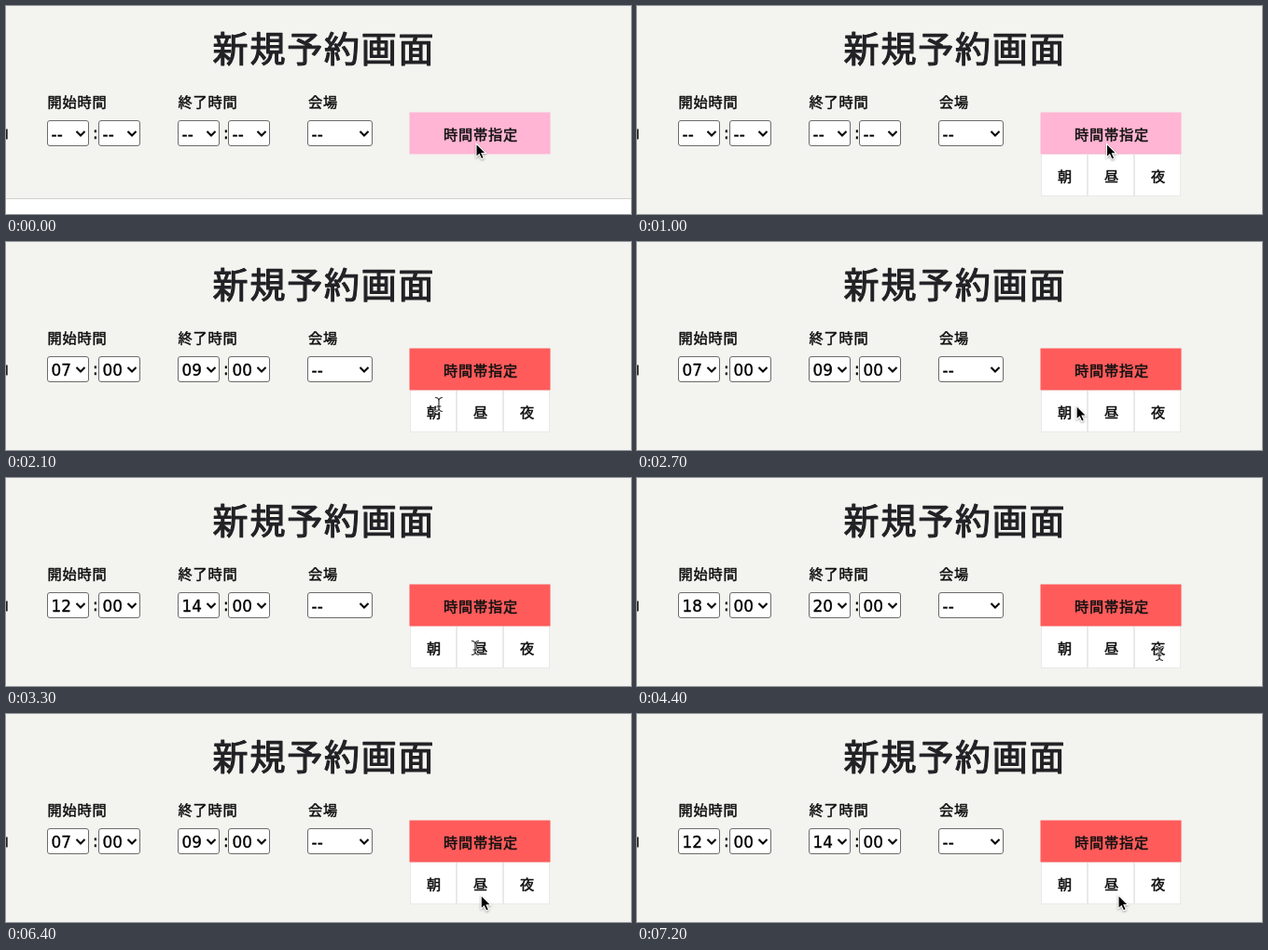
An HTML page for the animation above (7300 ms loop, 670 by 224 pixels).

```html
<!DOCTYPE html>
<html lang="ja">
<head>
<meta charset="utf-8">
<style>
  html, body { margin: 0; width: 100%; height: 100%; overflow: hidden; background: #f3f3ef; }
  svg { display: block; }
  text {
    font: 15.2px "Noto Sans CJK JP", "Noto Sans CJK", sans-serif; letter-spacing: .8px;
    fill: #111; stroke: #111; stroke-width: .5; stroke-linejoin: round;
  }
  .title { font-size: 38px; letter-spacing: 1.8px; fill: #222226; stroke: #222226; stroke-width: 1.2; }
  .middle { text-anchor: middle; }
  .value { font: 16.8px "DejaVu Sans", sans-serif; letter-spacing: 0; fill: #000; stroke: #000; stroke-width: .35; }
  .box { fill: #fff; stroke: #6b6b6b; }
  .cell { fill: #fff; stroke: #e9e9e8; }
  .chevron { fill: none; stroke: #000; stroke-width: 2.1; }
  #arrow { filter: drop-shadow(0 1px 1px rgba(0, 0, 0, .35)); }
</style>
</head>
<body>
<svg width="670" height="224" viewBox="0 0 670 224">
  <text class="title middle" x="341" y="60">新規予約画面</text>
  <rect y="132.5" width="1.7" height="11" fill="#222"/>
  <text x="44.5" y="109.4">開始時間</text>
  <text x="184.5" y="109.4">終了時間</text>
  <text x="324" y="109.4">会場</text>
  <text class="value" x="93" y="143">:</text>
  <text class="value" x="233" y="143">:</text>
  <g id="selects"></g>
  <g id="footer">
    <rect y="207" width="670" height="17" fill="#fff"/>
    <path d="M0 207.5H670" stroke="#cfcfcd"/>
  </g>
  <g id="menu"></g>
  <rect id="button" x="432.5" y="114.5" width="151" height="45"/>
  <text class="middle" x="509" y="143.7">時間帯指定</text>
  <path id="arrow" d="M0 0V14.6L3.3 11.6 5.6 16.8 8.3 15.6 6 10.5H10.5Z" fill="#000" stroke="#fff" stroke-width="1.1"/>
  <g id="beam" fill="none" stroke-linecap="round">
    <path d="M-3.5-7.5Q0-7.5 0-5V5Q0 7.5-3.5 7.5M3.5-7.5Q0-7.5 0-5M3.5 7.5Q0 7.5 0 5M-2 2H2" stroke="#fff" stroke-width="2.4"/>
    <path d="M-3.5-7.5Q0-7.5 0-5V5Q0 7.5-3.5 7.5M3.5-7.5Q0-7.5 0-5M3.5 7.5Q0 7.5 0 5M-2 2H2" stroke="#111"/>
  </g>
</svg>
<script>
const LOOP = 7300, STEP = 100;
const el = id => document.getElementById(id);
const ease = (t, from, to) => {
  const u = Math.min(1, Math.max(0, (t - from) / (to - from)));
  return u * u * (3 - 2 * u);
};

// Start hour, start minute, end hour, end minute, venue
const selects = [[44, 45], [99, 45], [184, 45], [238, 45], [323, 70]];
el('selects').innerHTML = selects.map(([x, w]) => `
  <rect class="box" x="${x + .5}" y="123.5" width="${w - 1}" height="27" rx="2.5"/>
  <text class="value" x="${x + 4.6}" y="144">--</text>
  <path class="chevron" d="M${x + w - 13.5} 135l4.5 4.5 4.5-4.5"/>`).join('');
const values = [...document.querySelectorAll('#selects text')];

const cells = ['朝', '昼', '夜'].map((label, i) => ({ label, center: 458.5 + 50 * i }));
el('menu').innerHTML = cells.map(({ label, center }) => `
  <rect class="cell" x="${center - 25}" y="159.5" width="49" height="45"/>
  <text class="middle" x="${center + .4}" y="188.5">${label}</text>`).join('');

const choices = [
  [1800, '07', '09'], [3300, '12', '14'], [4400, '18', '20'],
  [5600, '07', '09'], [6700, '12', '14']
];

// Pointer moves: start, end, x, y, downward bulge of the path
const moves = [
  [950, 1700, 464, 175, 0],
  [2550, 3100, 503, 183, 0],
  [3650, 4100, 560, 189, 3],
  [4650, 5400, 459, 194, 20],
  [5950, 6500, 514, 195, 1],
  [6950, 7200, 516, 195, 0]
];

function pointerAt(t) {
  let x = 504, y = 148;
  for (const [from, to, endX, endY, bulge] of moves) {
    const u = ease(t, from, to);
    x += (endX - x) * u;
    y += (endY - y) * u + 4 * bulge * u * (1 - u);
  }
  return [x, y];
}

function draw(t) {
  const open = t >= 100;
  el('footer').style.display = open ? 'none' : '';
  el('menu').style.opacity = ease(t, 50, 600) * open;

  const red = ease(t, 1200, 1600);
  const mix = (a, b) => Math.round(a + (b - a) * red);
  el('button').setAttribute('fill', `rgb(255,${mix(181, 91)},${mix(211, 91)})`);

  const choice = choices.filter(c => t >= c[0]).pop();
  const shown = choice ? [choice[1], '00', choice[2], '00', '--'] : Array(5).fill('--');
  values.forEach((node, i) => node.textContent = shown[i]);

  const [x, y] = pointerAt(t);
  const overText = open && Math.abs(y - 183) < 10 && cells.some(c => Math.abs(x - c.center) < 8);
  for (const [id, visible] of [['arrow', !overText], ['beam', overText]]) {
    el(id).style.display = visible ? '' : 'none';
    el(id).setAttribute('transform', `translate(${x} ${y})`);
  }
}

const begin = performance.now();
function tick() {
  const t = (performance.now() - begin) % LOOP;
  draw(Math.floor(t / STEP) * STEP);
  requestAnimationFrame(tick);
}
tick();
</script>
</body>
</html>
```
